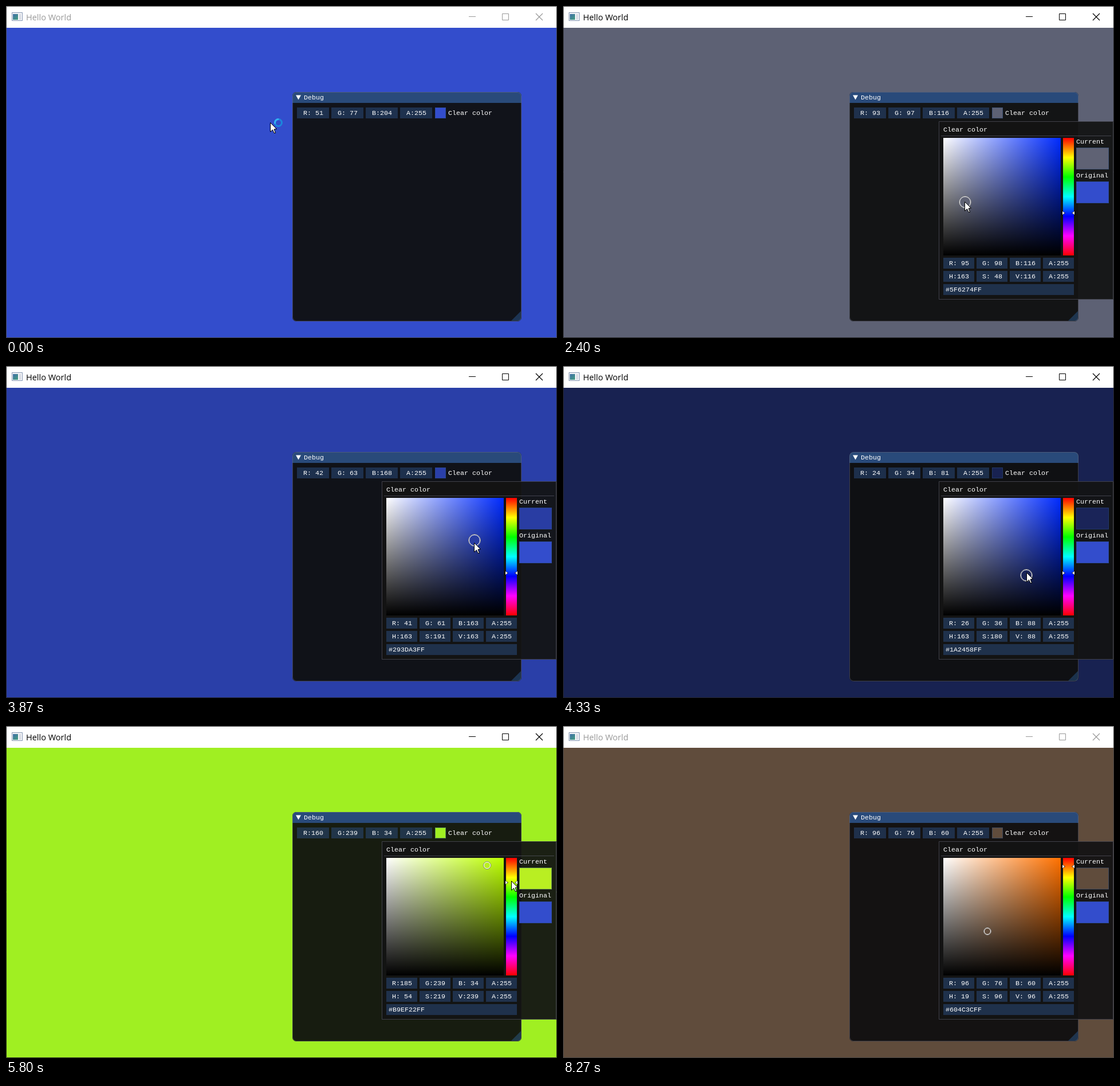
An HTML page with a canvas that plays this animation: 962x579 px, repeating every 8.39 s.

```html
<!DOCTYPE html>
<html lang="en">
<head>
<meta charset="utf-8">
<title>Colour picker</title>
<style>
  html, body { margin: 0; width: 100%; height: 100%; overflow: hidden; }
  canvas { display: block; }
</style>
</head>
<body>
<canvas id="stage" width="962" height="579"></canvas>
<script>
const ctx = document.getElementById('stage').getContext('2d');
const LOOP = 8390, STEP = 200 / 3, LAG = 17;
const MONO = '11.667px "Liberation Mono", monospace';
const SANS = '14.5px "Open Sans", "Noto Sans", sans-serif';
const BORDER = 'rgba(110,110,128,.5)', FRAME = 'rgba(41,74,122,.54)';
const SV = { x: 664, y: 230, size: 205 };
const START = { h: 230 / 360, s: .75, v: .8 };

const FOCUS = 1066, POPUP = 1190, BLUR = 8260;
const SV_DRAG = [1630, 4916], HUE_DRAG = [5300, 6000], SV_DRAG_2 = [6200, 7530];

// Where the hand turns or rests: time, x, y
const TURNS = [
  [133, 461, 203], [680, 804, 229], [1000, 758, 187], [1190, 758, 187],
  [1530, 817, 271], [1610, 817, 271], [2383, 702, 341], [2750, 680, 312],
  [3116, 736, 273], [3500, 820, 240], [3850, 817, 304], [4150, 802, 388],
  [4800, 839, 243], [4916, 839, 243], [5300, 882, 361], [6000, 882, 245],
  [6200, 839, 243], [6850, 725, 430], [6966, 757, 369], [7060, 790, 300],
  [7450, 741, 357], [7530, 741, 357], [7933, 142, 570], [8000, 115, 590]
];

const clamp = (v, lo, hi) => Math.min(hi, Math.max(lo, v));
const slope = (p, q, axis) => (q[axis] - p[axis]) / (q[0] - p[0]);

function tangent(i, axis) {
  if (i === 0 || i === TURNS.length - 1) return 0;
  const a = slope(TURNS[i - 1], TURNS[i], axis), b = slope(TURNS[i], TURNS[i + 1], axis);
  return a * b > 0 ? 2 * a * b / (a + b) : 0;
}

// Monotone cubic through the turning points
function pointer(t) {
  t = clamp(t, TURNS[0][0], TURNS.at(-1)[0]);
  const i = Math.max(0, TURNS.findIndex(p => p[0] >= t) - 1);
  const p = TURNS[i], q = TURNS[i + 1], d = q[0] - p[0], u = (t - p[0]) / d;
  const [x, y] = [1, 2].map(axis => Math.round(
    p[axis] + (q[axis] - p[axis]) * u * u * (3 - 2 * u) +
    d * u * (1 - u) * (tangent(i, axis) * (1 - u) - tangent(i + 1, axis) * u)));
  return { x, y };
}

function pickedColor(t) {
  if (t < SV_DRAG[0]) return START;
  const p = pointer(Math.min(t, t < SV_DRAG_2[0] ? SV_DRAG[1] : SV_DRAG_2[1]));
  const unit = v => clamp(v / (SV.size - 1), 0, 1);
  return {
    h: t < HUE_DRAG[0] ? START.h : unit(pointer(Math.min(t, HUE_DRAG[1])).y - SV.y),
    s: unit(p.x - SV.x),
    v: 1 - unit(p.y - SV.y)
  };
}

const byte = v => Math.floor(v * 255 + .5);
function toRgb({ h, s, v }) {
  return [5, 3, 1].map(n => {
    const k = (n + h * 6) % 6;
    return byte(v - v * s * clamp(Math.min(k, 4 - k), 0, 1));
  });
}
const css = rgb => `rgb(${rgb})`;

function rect(x, y, w, h, fill) {
  ctx.fillStyle = fill;
  ctx.fillRect(x, y, w, h);
}
function stroke(color, width = 1) {
  ctx.strokeStyle = color;
  ctx.lineWidth = width;
  ctx.stroke();
}
function outline(x, y, w, h, color, radius = 0) {
  ctx.beginPath();
  ctx.roundRect(x + .5, y + .5, w - 1, h - 1, radius);
  stroke(color);
}
function text(s, x, y, color = '#fff', font = MONO) {
  ctx.font = font;
  ctx.fillStyle = color;
  ctx.fillText(s, x, y);
}
function polygon(points, fill) {
  ctx.beginPath();
  points.forEach(([x, y]) => ctx.lineTo(x, y));
  ctx.closePath();
  ctx.fillStyle = fill;
  ctx.fill();
}
function arc(x, y, r, from = 0, to = Math.PI * 2) {
  ctx.beginPath();
  ctx.arc(x, y, r, from, to);
}
function gradient(x0, y0, x1, y1, colors) {
  const g = ctx.createLinearGradient(x0, y0, x1, y1);
  colors.forEach((c, i) => g.addColorStop(i / (colors.length - 1), c));
  return g;
}
function swatch(x, y, w, h, color) {
  rect(x, y, w, h, color);
  outline(x, y, w, h, FRAME);
}
function fields(letters, values, x, y, w) {
  [...letters].forEach((letter, i) => {
    const left = x + i * (w + 4);
    rect(left, y, w, 19, FRAME);
    text(`${letter}:${String(values[i]).padStart(3)}`, Math.floor(left + w / 2 - 17), y + 13);
  });
}

function drawFrame(active, color) {
  rect(0, 0, 962, 579, color);
  rect(0, 0, 962, 38, '#fff');
  outline(0, 0, 962, 579, active ? '#222' : '#404040');
  swatch(10, 11, 19, 15, '#f4f5f8');
  rect(12, 14, 9, 10, gradient(12, 14, 21, 24, ['#3e6da8', '#46a080']));
  rect(23, 14, 3, 10, '#d5d9e2');

  const ink = active ? '#000' : '#999';
  text('Hello World', 35, 25, ink, SANS);
  rect(808, 18, 12, 1, ink);
  outline(866, 13, 12, 12, ink);
  ctx.beginPath();
  for (const side of [-6, 6]) {
    ctx.moveTo(931 - side, 13);
    ctx.lineTo(931 + side, 25);
  }
  stroke(ink, 1.2);
}

function drawDebug(rgb) {
  ctx.save();
  ctx.beginPath();
  ctx.roundRect(500, 150, 400, 400, 7);
  ctx.clip();
  rect(500, 150, 400, 400, 'rgba(15,15,15,.94)');
  rect(500, 150, 400, 19, '#294a7a');
  polygon([[899, 532], [899, 549], [882, 549]], 'rgba(66,150,250,.25)');
  ctx.restore();
  outline(500, 150, 400, 400, BORDER, 7);
  polygon([[506, 155.6], [515, 155.6], [510.5, 163.4]], '#fff');
  text('Debug', 520, 163);
  fields('RGBA', [...rgb, 255], 508, 177, 56);
  swatch(749, 177, 19, 19, css(rgb));
  text('Clear color', 772, 190);
}

// Pair of arrowheads that point at the hue bar from both sides
function hueArrows(y) {
  for (const [tip, length, half, color] of [[5.5, 6, 4, '#000'], [6.5, 4, 3, '#fff']]) {
    for (const side of [-1, 1]) {
      const x = 882.5 + side * tip, base = x + side * length;
      polygon([[x, y], [base, y - half], [base, y + half]], color);
    }
  }
}

function drawPicker(t) {
  const color = pickedColor(t), rgb = toRgb(color), { x, y, size } = SV;
  rect(656, 201, 305, 311, 'rgba(20,20,20,.94)');
  outline(656, 201, 305, 311, BORDER);
  text('Clear color', 664, 219);
  rect(660, 226, 297, 1, BORDER);

  const pure = css(toRgb({ h: color.h, s: 1, v: 1 }));
  rect(x, y, size, size, gradient(x, 0, x + size, 0, ['#fff', pure]));
  rect(x, y, size, size, gradient(0, y, 0, y + size, ['rgba(0,0,0,0)', '#000']));
  const rainbow = Array.from({ length: 7 }, (_, i) => `hsl(${i * 60} 100% 50%)`);
  rect(873, y, 19, size, gradient(0, y, 0, y + size, rainbow));
  hueArrows(Math.round(y + color.h * size));

  text('Current', 896, 240);
  swatch(896, 247, 57, 38, css(rgb));
  text('Original', 896, 299);
  swatch(896, 306, 57, 38, css(toRgb(START)));

  const cx = Math.round(x + color.s * size), cy = Math.round(y + (1 - color.v) * size);
  const dragging = [SV_DRAG, SV_DRAG_2].some(([from, to]) => t >= from && t <= to);
  const r = dragging ? 10 : 6;
  arc(cx, cy, r);
  ctx.fillStyle = css(rgb);
  ctx.fill();
  arc(cx, cy, r + .5);
  stroke('#808080');
  arc(cx, cy, r - .5);
  stroke('#fff');

  fields('RGBA', [...rgb, 255], 664, 439, 54);
  fields('HSVA', [byte(color.h), byte(color.s), byte(color.v), 255], 664, 462, 54);
  rect(664, 485, 228, 19, FRAME);
  const hex = [...rgb, 255].map(v => v.toString(16).padStart(2, '0')).join('');
  text('#' + hex.toUpperCase(), 668, 498);
}

function drawPointer(t) {
  const { x, y } = pointer(t);
  ctx.save();
  ctx.translate(x + .5, y + .5);
  polygon([[0, 0], [0, 16], [4, 12.4], [6.6, 18], [9, 18], [6.6, 11.4], [11, 11]], '#fff');
  stroke('#000');
  if (t < FOCUS) {
    const a = Math.PI * .9 + t / 160;
    arc(14, 0, 6);
    stroke('#1c86dc', 3);
    arc(14, 0, 6, a, a + 2);
    stroke('#35b1f2', 3);
  }
  ctx.restore();
}

function draw(ms) {
  const t = ms < 195 ? 0 : 200 + Math.floor((ms - 195) / STEP) * STEP;
  const rgb = toRgb(pickedColor(t - 2 * LAG));
  drawFrame(t >= FOCUS && t < BLUR, css(rgb));
  drawDebug(rgb);
  if (t >= POPUP) drawPicker(t - LAG);
  drawPointer(t);
}

const begin = performance.now();
function tick() {
  draw((performance.now() - begin) % LOOP);
  requestAnimationFrame(tick);
}
tick();
</script>
</body>
</html>
```
